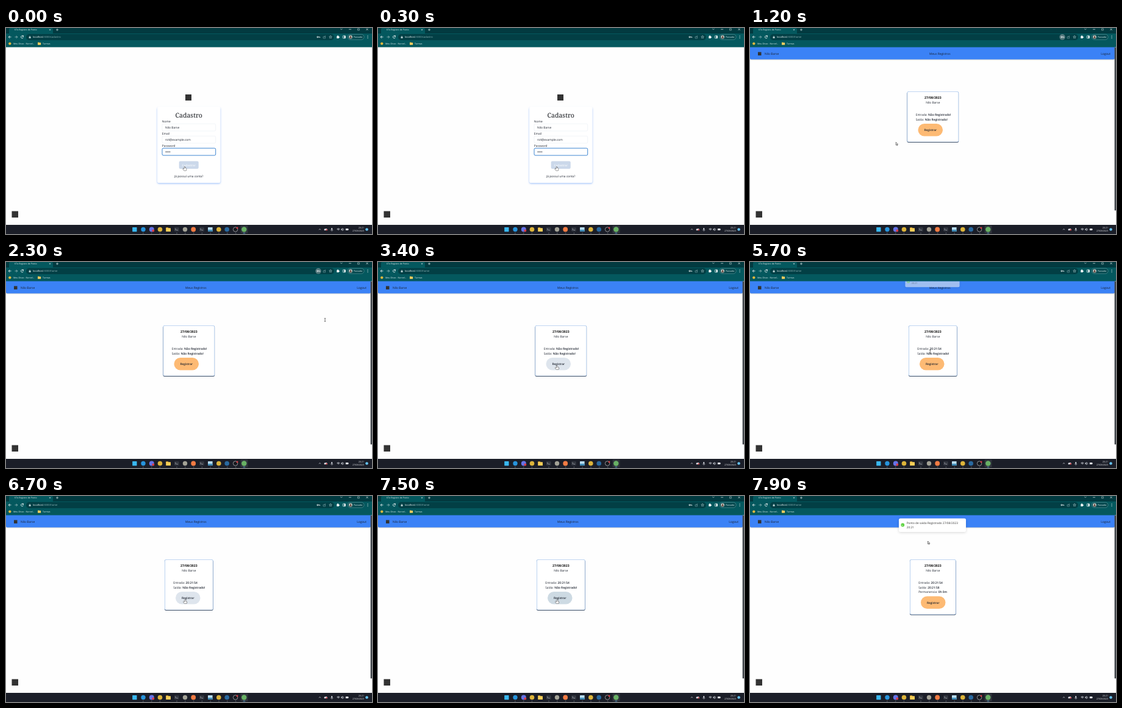
An HTML page with a canvas that plays this animation: 600 px wide and 338 px high, repeating every 8 s.

```html
<!DOCTYPE html>
<html lang="pt-BR">
<head>
<meta charset="utf-8">
<title>Registro de Ponto</title>
<style>
html, body { margin: 0; width: 100%; height: 100%; overflow: hidden; background: #fefefe; }
canvas { display: block; width: 600px; height: 338px; }
</style>
</head>
<body>
<canvas id="stage"></canvas>
<script>
const W = 600, H = 338, LOOP = 8000;
const HOME_AT = 400, KEY_OFF = 3000, ENTRY_AT = 3650, EXIT_AT = 7530;
const USER = 'Nilo Barse', MAIL = 'ni4@example.com';
const SANS = '"Open Sans", "Noto Sans", sans-serif', SERIF = '"Noto Serif", serif';
const INK = '#1a202c', LOGO = '#333333', ORANGE = [253, 186, 116], GREY = [222, 229, 237], PRESSED = [205, 218, 227];

const canvas = document.getElementById('stage');
const ctx = canvas.getContext('2d');
const dpr = window.devicePixelRatio || 1;
canvas.width = W * dpr;
canvas.height = H * dpr;

const clamp = v => Math.min(1, Math.max(0, v));
const mix = (a, b, p) => a + (b - a) * p;
const mixColor = (a, b, p) => `rgb(${a.map((v, i) => Math.round(mix(v, b[i], p))).join(',')})`;

function bezier(x1, y1, x2, y2) {
  const at = (a, b, u) => 3 * a * u * (1 - u) ** 2 + 3 * b * u * u * (1 - u) + u ** 3;
  return x => {
    if (x <= 0) return 0;
    if (x >= 1) return 1;
    let lo = 0, hi = 1;
    for (let i = 0; i < 24; i++) {
      const mid = (lo + hi) / 2;
      if (at(x1, x2, mid) < x) lo = mid; else hi = mid;
    }
    return at(y1, y2, lo);
  };
}
const toastIn = bezier(.21, 1.02, .73, 1), toastOut = bezier(.06, .71, .55, 1);

// ---- drawing helpers ----
function rect(x, y, w, h, fill, r = 0) {
  ctx.beginPath();
  ctx.roundRect(x, y, w, h, r);
  ctx.fillStyle = fill;
  ctx.fill();
}
function frame(x, y, w, h, color, r = 0, width = .5) {
  ctx.beginPath();
  ctx.roundRect(x, y, w, h, r);
  ctx.strokeStyle = color;
  ctx.lineWidth = width;
  ctx.stroke();
}
function disc(x, y, r, fill) {
  ctx.beginPath();
  ctx.arc(x, y, r, 0, Math.PI * 2);
  ctx.fillStyle = fill;
  ctx.fill();
}
function line(points, color, width = .7) {
  ctx.beginPath();
  points.forEach(([x, y]) => ctx.lineTo(x, y));
  ctx.strokeStyle = color;
  ctx.lineWidth = width;
  ctx.stroke();
}
function arc(x, y, r, from, to, color, width = .7) {
  ctx.beginPath();
  ctx.arc(x, y, r, from * Math.PI, to * Math.PI);
  ctx.strokeStyle = color;
  ctx.lineWidth = width;
  ctx.stroke();
}
// Drawn large and scaled down so that tiny glyphs keep true spacing.
function text(str, x, y, { size = 4.85, color = INK, weight = 400, align = 'left', family = SANS } = {}) {
  ctx.save();
  ctx.translate(x, y);
  ctx.scale(.25, .25);
  ctx.font = `${weight} ${size * 4}px ${family}`;
  ctx.textRendering = 'geometricPrecision';
  ctx.textAlign = align;
  ctx.fillStyle = color;
  ctx.fillText(str, 0, 0);
  const width = ctx.measureText(str).width / 4;
  ctx.restore();
  return width;
}
function withShadow(color, blur, dy, draw) {
  ctx.save();
  ctx.shadowColor = color;
  ctx.shadowBlur = blur * dpr;
  ctx.shadowOffsetY = dy * dpr;
  draw();
  ctx.restore();
}

// ---- browser and desktop ----
function drawBrowser(t) {
  const home = t >= HOME_AT, pale = '#d5e6e7';
  rect(0, 0, W, 10, '#023a40');
  rect(0, 9, W, 22.5, '#04585e');
  rect(5, 0, 72, 12, '#04585e', 2);
  text('K7o Registro de Ponto', 14, 4.3, { size: 3.55, color: '#f0f7f7' });
  line([[71, 1.7], [73.2, 3.9]], pale);
  line([[73.2, 1.7], [71, 3.9]], pale);
  line([[82, 2.9], [86, 2.9]], pale);
  line([[84, .9], [84, 4.9]], pale);

  line([[548.3, 1.2], [549.8, 2.7], [551.3, 1.2]], pale);
  line([[562, 2.2], [566, 2.2]], pale);
  frame(576.5, 1, 2.8, 2.8, pale);
  line([[590.5, .8], [593.5, 3.8]], pale);
  line([[593.5, .8], [590.5, 3.8]], pale);

  const y = 14.8;
  line([[8.5, y], [4.2, y]], '#ffffff', .8);
  line([[6.3, y - 2.1], [4.2, y], [6.3, y + 2.1]], '#ffffff', .8);
  line([[14.5, y], [18.8, y]], '#9dbfc1', .8);
  line([[16.7, y - 2.1], [18.8, y], [16.7, y + 2.1]], '#9dbfc1', .8);
  arc(26.5, y, 2, .1, 1.75, '#ffffff', .8);
  rect(27, 12.5, 1.9, 1.7, '#ffffff');

  rect(33, 10, 505, 10, '#023f45', 5);
  rect(37.6, 14.4, 3, 2.4, pale, .4);
  arc(39.1, 14.4, 1, 1, 2, pale, .6);
  const host = text('localhost', 44, 16.4, { size: 4.1, color: '#ffffff' });
  text(':3000/' + (home ? 'home' : 'cadastro'), 44 + host, 16.4, { size: 4.1, color: '#94b8bb' });

  if (home && t < KEY_OFF) disc(512, y, 4.8, '#55797e');
  arc(510.8, y, 1, 0, 2, '#ffffff', .8);
  line([[511.8, y], [514.6, y], [514.6, y + 1.2]], '#ffffff', .8);
  frame(520, 14, 3.5, 3, '#8fb1b4');
  line([[521.5, 15], [524, 12.6]], '#8fb1b4');
  ctx.beginPath();
  for (let i = 0; i < 10; i++) {
    const a = -Math.PI / 2 + i * Math.PI / 5, r = i % 2 ? 1.1 : 2.4;
    ctx.lineTo(532 + r * Math.cos(a), y + r * Math.sin(a));
  }
  ctx.closePath();
  ctx.strokeStyle = pale;
  ctx.lineWidth = .5;
  ctx.stroke();
  rect(542.2, 13.3, 3.6, 3.6, '#ffffff', .3);
  disc(544, 13.1, .9, '#ffffff');
  disc(546, 15.1, .9, '#ffffff');
  frame(552.3, 12.8, 4, 4, '#ffffff', .3, .7);
  rect(554.4, 12.8, 2, 4, '#ffffff');

  rect(560, 10.4, 27, 8.7, '#064a50', 4.3);
  frame(560, 10.4, 27, 8.7, '#72a6ab', 4.3);
  disc(564.9, y, 3, '#b9c5c1');
  disc(564.9, 13.8, 1.1, '#6c4a40');
  rect(563.1, 15.1, 3.6, 2, '#6c4a40', 1);
  text('Pausada', 570, 16.1, { size: 3.6, color: '#e9f4f4' });
  [12.7, 14.7, 16.7].forEach(v => disc(593, v, .55, '#ffffff'));

  disc(6.3, 25.6, 2.2, '#e3b93c');
  text('Meu Disco - Norvel...', 12, 26.9, { size: 3.6, color: '#e9f4f4' });
  rect(52, 23.4, 2.6, 2, '#e2b13c', .4);
  rect(52, 24, 5.2, 3.8, '#f4cc5e', .4);
  text('Turmas', 60, 26.9, { size: 3.6, color: '#e9f4f4' });
}

function drawTaskbar() {
  rect(0, 323, W, 15, '#1b1e28');
  const y = 330.5, soft = '#dfe3ea';
  const terminal = x => {
    rect(x - 3.8, y - 3.2, 7.6, 6.4, '#343841', .6);
    line([[x - 2.6, y - 1.5], [x - 1.2, y - .2], [x - 2.6, y + 1.1]], soft, .6);
    line([[x - .5, y + 1.2], [x + 1.7, y + 1.2]], soft, .6);
  };
  rect(207.2, y - 3.6, 7.3, 7.3, '#39b8f2', .4);
  disc(225, y, 3.7, '#2794dc');
  disc(238.8, y, 4, '#6673e8');
  disc(241.3, y + 2, 1.9, '#dc3d45');
  disc(252.5, y, 3.8, '#ddb43a');
  rect(262.2, y - 3.3, 4, 3, '#dda52c', .5);
  rect(262.2, y - 2.3, 7.8, 5.8, '#f7ce58', .5);
  terminal(279.8);
  disc(293.5, y, 3.7, '#a3a296');
  disc(307.2, y, 3.9, '#f47b43');
  terminal(321);
  rect(331, y - 3.6, 7.6, 7.2, '#b7dcef', .5);
  rect(331, y + .5, 7.6, 3.1, '#448fb9', .4);
  disc(348.8, y, 3.8, '#ddb43a');
  disc(362.2, y, 3.8, '#2969a0');
  disc(376.1, y, 4, '#15171c');
  arc(376.1, y, 3.7, 0, 2, '#c8cbd0');
  disc(379, y - 2.6, 1.5, '#dc3d45');
  rect(384.5, 324.2, 12, 12.6, '#30343d', 1.2);
  disc(390.3, y, 4.2, '#68b165');
  for (let i = 1; i < 14; i++) {
    if (i === 4) continue;
    const last = i === 13, w = last ? 4 : 1.8;
    rect(211 + i * 13.8 - w / 2, 336.2, w, .8, last ? '#66b9ee' : '#858a92', .4);
  }

  line([[512.9, 331.2], [514.5, 329.7], [516.1, 331.2]], soft);
  disc(523, 330.8, 1.5, soft);
  disc(525, 330.5, 1.6, soft);
  disc(525.6, 331.3, 1.2, '#d75158');
  rect(533.3, 328, 1.8, 3.5, soft, .9);
  arc(534.2, 330.8, 1.8, 0, 1, soft, .5);
  line([[534.2, 332.6], [534.2, 333.5]], soft, .5);
  [1.2, 2.3, 3.4].forEach(r => arc(544.8, 332.4, r, 1.25, 1.75, soft));
  rect(549.4, 329.6, 1.5, 2, soft);
  line([[550.9, 329.6], [552, 328.6], [552, 332.6], [550.9, 331.6]], soft);
  arc(552, 330.6, 1.8, -.3, .3, soft, .5);
  rect(556.8, 329, 4.4, 3, soft, .5);
  rect(561.4, 329.9, .6, 1.2, soft);
  text('20:21', 587, 329, { size: 3.6, color: '#f1f2f5', align: 'right' });
  text('27/08/2023', 587, 334.4, { size: 3.6, color: '#f1f2f5', align: 'right' });
  disc(591.5, 330.5, 2.3, '#65c2f1');
}

// ---- pages ----
function drawSignup() {
  rect(294, 109, 10, 10, LOGO);
  withShadow('rgba(59,130,246,.55)', 3, 1, () => rect(248.3, 130, 103, 124.3, '#ffffff', 2.5));
  rect(248.3, 129, 103, 124.6, '#ffffff', 2.5);
  text('Cadastro', 299.7, 147, { size: 10.6, align: 'center', family: SERIF, color: '#15181d' });
  ['Nome', 'Email', 'Password'].forEach((label, i) => {
    const y = 157 + 20 * i, focus = i === 2;
    text(label, 255.8, y - 2.1);
    frame(256, y + .2, 87.7, 11.8, focus ? '#3e86d2' : '#e2e8f0', 2, focus ? 1 : .5);
    if (!focus) text(i ? MAIL : USER, 261, y + 7.8);
  });
  for (let i = 0; i < 4; i++) disc(262.2 + i * 2.1, 203.2, .75, INK);
  rect(283.7, 218.4, 32, 12.6, '#cbd8ea', 2);
  text('Cadastrar', 299.7, 226.5, { weight: 600, color: '#f7fafd', align: 'center', size: 4.7 });
  text('Já possuí uma conta?', 299.7, 244.9, { align: 'center' });
}

// Card layouts before, between and after the two registrations.
const bold = (label, value) => ({ label, value });
const MISSING = 'Não Registrado!';
const LAYOUTS = [
  { left: 257.5, bottom: 187.5, rows: [bold('Entrada:', MISSING), bold('Saída:', MISSING)] },
  { left: 260, bottom: 187.5, rows: [bold('Entrada:', '20:21:54'), bold('Saída:', MISSING)] },
  { left: 262, bottom: 195, rows: [bold('Entrada:', '20:21:54'), bold('Saída:', '20:21:58'), bold('Permanencia:', '0h 0m')] }
];
const layoutAt = t => LAYOUTS[t < ENTRY_AT ? 0 : t < EXIT_AT ? 1 : 2];
const buttonOf = card => ({ x: card.left + 18, y: card.bottom - 30.6, w: 40.5, h: 20.6 });

function drawHome(t) {
  withShadow('rgba(0,0,0,.25)', 2, .6, () => rect(0, 31, 598, 20.5, '#3b82f6', [0, 0, 2, 2]));
  rect(13, 39.5, 5.5, 5.5, LOGO);
  text(USER, 24, 43.7);
  text('Meus Registros', 311.3, 43.7, { align: 'center' });
  text('Logout', 591, 43.7, { align: 'right' });

  const card = layoutAt(t), { left, bottom, rows } = card, width = 2 * (299.8 - left);
  rect(left, 105, width, bottom - 104.4, '#46566c', 2.4);
  rect(left, 104.2, width, bottom - 104.6, '#8eb6e8', 2.4);
  rect(left + .6, 104.8, width - 1.2, bottom - 105.5, '#ffffff', 2);
  text('27/08/2023', 299.8, 116.4, { weight: 700, align: 'center', size: 5.1, color: '#000000' });
  text(USER, 299.8, 124, { align: 'center' });
  rows.forEach(({ label, value }, i) => {
    const x = left + 14.2, y = 144 + 7.6 * i;
    const w = text(label + ' ', x, y);
    text(value, x + w + .2, y, { weight: 600 });
  });
  const b = buttonOf(card);
  const idle = mixColor(ORANGE, t > 7350 ? PRESSED : GREY, hoverAmount(t));
  rect(b.x, b.y, b.w, b.h, idle, b.h / 2);
  text('Registrar', b.x + b.w / 2, b.y + 12.2, { weight: 600, align: 'center', size: 4.75 });
  rect(597.6, 31.5, 2.4, 268, '#41464b', 1.2);
}

function drawToast(t, start, kind) {
  const age = t - start, stay = 2000;
  if (age < 0 || age > stay + 400) return;
  const p = age < stay ? 1 - toastIn(age / 350) : toastOut((age - stay) / 400);
  const leaving = age >= stay;
  ctx.save();
  ctx.beginPath();
  ctx.rect(0, 31.5, W, 291.5);
  ctx.clip();
  ctx.globalAlpha = 1 - p * (leaving ? 1 : .5);
  ctx.translate(299, 48 - 22 * p * (leaving ? 1.5 : 2));
  ctx.scale(1 - .4 * p, 1 - .4 * p);
  withShadow('rgba(0,0,0,.16)', 4, 1, () => rect(-55, -11.2, 110, 22.2, '#ffffff', 2.5));
  const pop = clamp((age - 100) / 300);
  disc(-48.7, -.5, 3.2 * pop, '#61d345');
  const tick = clamp((age - 300) / 200);
  if (tick > 0) line([[-50.1, -.4], [-49.1, .7], [mix(-49.1, -47.2, tick), mix(.7, -1.6, tick)]], '#ffffff', .7);
  text(`Ponto de ${kind} Registrado 27/08/2023`, -42.3, -2, { size: 4.75, color: '#363636' });
  text('20:21', -42.3, 4.8, { size: 4.75, color: '#363636' });
  ctx.restore();
}

// ---- pointer: time, x, y of the hot spot ----
const PATH = [
  [0, 292.8, 227.2], [450, 292.8, 227.2], [850, 238, 196], [1200, 239.2, 187.4], [1300, 246, 185],
  [1500, 289, 172], [1620, 290, 174], [1750, 284, 192], [1950, 320, 185], [2300, 523, 95],
  [2500, 532, 95], [2700, 527, 95], [3250, 293.3, 169.8], [5200, 293.3, 169.8], [5500, 295, 149],
  [5700, 295.3, 147], [5950, 295, 147], [6300, 293.5, 169.8], [7600, 293.5, 169.8], [7850, 291.5, 74], [8000, 291.5, 74]
];
function pointerAt(t) {
  const i = Math.max(1, PATH.findIndex(k => k[0] >= t));
  const [t0, x0, y0] = PATH[i - 1], [t1, x1, y1] = PATH[i];
  const u = clamp((t - t0) / (t1 - t0)), p = u * u * (3 - 2 * u);
  return [mix(x0, x1, p), mix(y0, y1, p)];
}
function overButton(t) {
  if (t < HOME_AT) return true;
  const [x, y] = pointerAt(t), b = buttonOf(layoutAt(t));
  return x > b.x && x < b.x + b.w && y > b.y && y < b.y + b.h;
}
function hoverAmount(t) {
  let hits = 0;
  for (let i = 0; i < 6; i++) hits += overButton(Math.max(HOME_AT, t - i * 18));
  return hits / 6;
}
function drawPointer(t) {
  const [x, y] = pointerAt(t);
  ctx.save();
  ctx.translate(x, y);
  ctx.lineJoin = 'round';
  if (overButton(t)) {
    const hand = new Path2D('M-.5.4Q0-.2.5.4V2.6L2.5 3Q3.2 3.2 3 4.2L2.5 6.6H-1L-2.6 4.2Q-2.8 3.2-1.8 3.5L-.5 4.5Z');
    ctx.strokeStyle = '#202020';
    ctx.lineWidth = .9;
    ctx.stroke(hand);
    ctx.fillStyle = '#ffffff';
    ctx.fill(hand);
  } else if ((t > 2200 && t < 2750) || (t > 5400 && t < 6150)) {
    line([[-1.2, -2.6], [1.2, -2.6]], '#333333', .6);
    line([[0, -2.6], [0, 2.6]], '#333333', .7);
    line([[-1.2, 2.6], [1.2, 2.6]], '#333333', .6);
  } else {
    const arrow = new Path2D('M0 0V4.8L1.1 3.8L1.9 5.5L2.7 5.1L1.9 3.5H3.4Z');
    ctx.fillStyle = '#ffffff';
    ctx.fill(arrow);
    ctx.strokeStyle = '#252525';
    ctx.lineWidth = .6;
    ctx.stroke(arrow);
  }
  ctx.restore();
}

function render() {
  const t = performance.now() % LOOP;
  ctx.setTransform(dpr, 0, 0, dpr, 0, 0);
  rect(0, 0, W, H, '#fefefe');
  if (t < HOME_AT) drawSignup(); else drawHome(t);
  rect(9.5, 300.5, 10.5, 10.5, LOGO);
  drawToast(t, ENTRY_AT, 'entrada');
  drawToast(t, EXIT_AT, 'saída');
  drawBrowser(t);
  drawTaskbar();
  drawPointer(t);
  requestAnimationFrame(render);
}
requestAnimationFrame(render);
</script>
</body>
</html>
```
